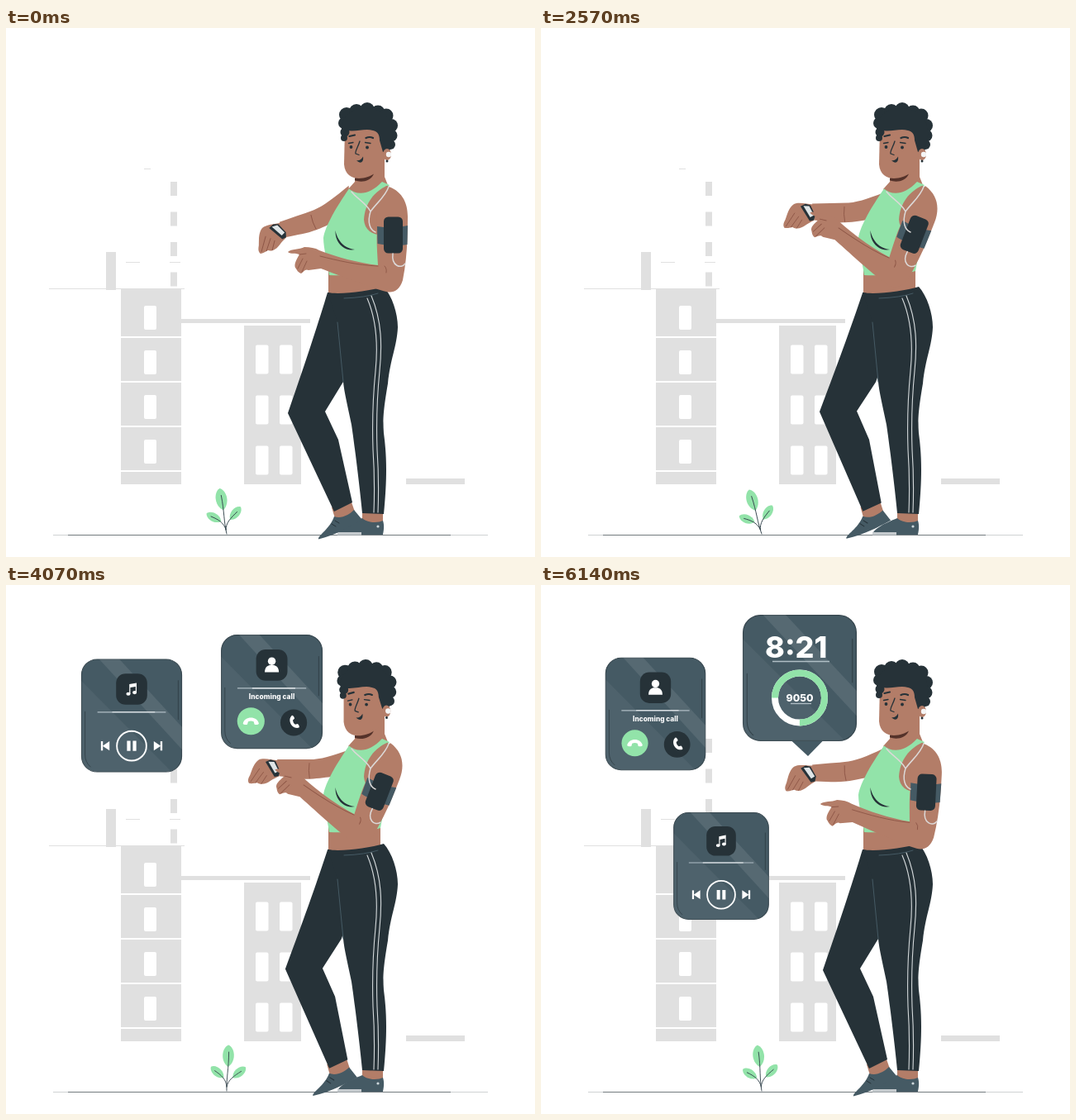
Write an HTML page that moves like this. It is 640x640 px and loops after 6.21 s.

```html
<!DOCTYPE html>
<html lang="en">
<head>
<meta charset="utf-8">
<title>Smartwatch</title>
<style>
html, body { margin: 0; width: 100%; height: 100%; overflow: hidden; background: #fff; }
svg { display: block; width: 100%; height: 100%; }
text { font-family: Inter, "Open Sans", sans-serif; font-weight: 800; fill: #fff; }
.dark { fill: #263238; }
.slate { fill: #455a64; }
.skin { fill: #b37d68; }
.mint { fill: #92e3a9; }
.white { fill: #fff; }
.line { fill: none; stroke-linecap: round; stroke-linejoin: round; }
.crease { stroke: #8d5646; stroke-width: .9; }
.ink { stroke: #263238; stroke-width: 1.3; }
.brow { stroke: #263238; stroke-width: 2.2; }
.cord { stroke: #dcd9d8; stroke-width: 1.5; }
.rule { stroke: #b0bec5; stroke-width: 1.3; }
</style>
</head>
<body>
<svg viewBox="0 0 640 640">
  <defs>
    <clipPath id="clip"><rect x="-65" y="-73" width="130" height="146" rx="20"/></clipPath>
    <g id="glass">
      <rect class="slate" x="-64.4" y="-72.4" width="128.8" height="144.8" rx="20" stroke="#37474f" stroke-width="1.2"/>
      <g clip-path="url(#clip)" fill="#fff">
        <path d="M-65-45L52 73H-65Z" opacity=".05"/>
        <path d="M-42-73H-16L65 15V44Z" opacity=".09"/>
      </g>
      <path class="line" d="M-60-5V50Q-60 60-53 66M60 5V-45" stroke="#263238" opacity=".65"/>
    </g>
    <g id="badge">
      <use href="#glass"/>
      <rect class="dark" x="-20" y="-54" width="40" height="40" rx="12"/>
      <path class="rule" d="M-44-4.5H44"/>
      <path d="M-25-4.5H30" stroke="#eceff1" stroke-width="1.2"/>
    </g>
    <g id="skip" class="white">
      <rect x="-5.5" y="-6" width="2.5" height="12"/>
      <path d="M5.5-6V6L-3.5 0Z"/>
    </g>
    <path id="handset" class="white" d="M-10 3C-8-7 8-7 10 3Q9 5 4.500 4L3.500 .5Q0-1-3.500 .5L-4.500 4Q-9 5-10 3Z"/>
    <path id="leaf" class="mint" d="M0 0C-11-8-8-25 0-28C8-25 11-8 0 0Z"/>
  </defs>

  <g id="city"></g>
  <path d="M57 613.500H583" stroke="#cfd2d3"/>
  <path d="M75 613.500H538" stroke="#737b7f"/>

  <g id="music">
    <use href="#badge"/>
    <g class="white" transform="translate(0 -33.500) scale(.85)">
      <ellipse cx="-5" cy="6.500" rx="3.200" ry="2.600"/>
      <ellipse cx="4.500" cy="4.500" rx="3.200" ry="2.600"/>
      <path d="M-3.500 6.500V-8L7.500-10V4.500H6V-4.500L-2-3V6.500Z"/>
    </g>
    <path class="white" d="M-6 32.500h4.500v13h-4.500zM1.500 32.500H6v13H1.500z"/>
    <circle class="line" cy="39" r="19" stroke="#fff" stroke-width="2"/>
    <use href="#skip" x="-34" y="39"/>
    <use href="#skip" transform="translate(34 39) scale(-1 1)"/>
  </g>

  <g id="call">
    <use href="#badge"/>
    <circle class="white" cy="-39" r="5"/>
    <path class="white" d="M-9-25C-9-31-6-33-3-34H3C6-33 9-31 9-25Z"/>
    <text y="9.500" font-size="8.900" text-anchor="middle">Incoming call</text>
    <g id="answer">
      <circle class="mint" r="17.200"/>
      <use href="#handset"/>
    </g>
    <g transform="translate(28 39.500)">
      <circle class="dark" r="17"/>
      <use href="#handset" transform="rotate(-120) scale(.9)"/>
    </g>
  </g>

  <g id="clock">
    <path class="slate" d="M-11 75L10 94.500L29 75Z"/>
    <use href="#glass" transform="scale(1.062 1.048)"/>
    <text id="time" x="-42" y="-25" font-size="36">8:20</text>
    <path class="rule" d="M-33-20H36"/>
    <circle class="line" cy="24" r="30" stroke="#fff" stroke-width="8"/>
    <path id="ring" fill="none" d="M30 24A30 30 0 1 1 0-6" stroke="#92e3a9" stroke-width="8"/>
    <text y="28" font-size="12.300" text-anchor="middle">9050</text>
    <path class="rule" d="M-11 31H14"/>
  </g>

  <g id="plant">
    <use href="#leaf" transform="translate(268 583) scale(.95)"/>
    <use href="#leaf" transform="translate(263 596) rotate(-51) scale(.72)"/>
    <use href="#leaf" transform="translate(274 596) rotate(49) scale(.72)"/>
    <path class="line" d="M267 612C266 597 269 585 268.500 565M267 607C266 598 260 593 252 588M267 607C268 599 275 594 284 588" stroke="#37474f" stroke-width=".9"/>
  </g>

  <!-- waist and legs -->
  <path class="skin" d="M390 292V326H453V286Z"/>
  <path class="skin" d="M431 584H456V600H431Z"/>
  <path class="slate" d="M431 593C437 599 450 599 456 596C458 602 457 608 456 613H401C402 606 416 599 431 593Z"/>
  <path d="M401 610H430V613.500H401Z" fill="#c5cbce"/>
  <circle cx="450" cy="603" r="1.600" fill="#cfd8dc"/>
  <g id="leg">
    <path class="skin" d="M394 580L417 571L423 588C414 595 406 596 398 593Z"/>
    <path class="slate" d="M397 591C406 594 415 589 421 583L431 595C415 604 400 613 378 618.500C377 614 392 606 397 591Z"/>
    <path class="line" d="M394 600l5 3M398 596l5 3" stroke="#263238"/>
    <path class="dark" d="M389 320C380 350 364 400 341 466L397 585L419 574L402 498L386 464L408 428L440 330Z"/>
  </g>
  <path class="dark" d="M389 320C405 323 440 318 457 313C467 324 474 345 474 362C473 385 465 400 462 430C456 465 456 475 457 490C461 520 461 545 457 588L431 587C428 555 421 500 418 480C414 460 409 440 408 428L400 352Z"/>
  <path class="line" d="M401 356L408 428M409 327Q435 326 450 321" stroke="#455a64"/>
  <path class="line" d="M437 327C449 355 450 385 447 415C444 445 443 480 444 510C446 540 446 560 445 586M442 324C455 355 455 385 452 415C449 445 448 480 449 510C451 540 451 560 450 586" stroke="#d5dadc" stroke-width="1.100"/>

  <!-- watch arm -->
  <g id="reach">
    <path class="skin" d="M421 196C402 204 385 211 372 212C358 213 342 213 328 214L331 234C345 235 355 237 368 236C380 235 390 233 396 232L415 220Z"/>
    <path class="skin" d="M329 215C322 215 312 212 306 215C300 219 298 228 296 234C294 238 293 241 295 244C299 245 303 243 305 243C310 246 316 244 321 240C325 237 328 236 331 234Z"/>
    <path class="line crease" d="M367 217Q366 226 368 235M307 226L297 242M312 230L303 243M316 234L310 244"/>
    <path class="dark" d="M314 217.500L320 214.500L326 216L332 228L330.500 234L325.500 235Z"/>
    <path d="M317.500 217L324.500 217L330.500 228L326 230.500Z" fill="#dfe5e7"/>
  </g>

  <!-- torso -->
  <path class="skin" d="M424 172L422 186L414 195L432 212L462 190L458 180V150Z"/>
  <path class="mint" d="M415 194.500C425 203 440 202 455 186L464 190C455 200 462 230 463 240L453 294C440 298 410 300 391 299C389 285 384 266 384 254C386 240 400 216 415 194.500Z"/>
  <path class="skin" d="M462 190.500C446 197 434 212 433 232C434 244 442 250 456 251L472 225Z"/>
  <path class="dark" d="M398.500 245C401 258 410 267 422 268C410 270.500 398 261 398.500 245Z"/>

  <g id="head">
    <path class="skin" d="M410 122L409 165C410 177 418 182 427 182C440 181 447 177 458 168V120Z"/>
    <path d="M422 181.500C431 183 440 180 445 176.500C441 186 430 187 422 184.500Z" fill="#54322a"/>
    <g id="curls" class="dark"></g>
    <path class="dark" d="M406 122C405 108 418 97 435 97C458 97 470 112 468 130L464 150H456L452 136C452 128 449 125 444 124C434 121 424 126 412 124Z"/>
    <ellipse class="skin" cx="461" cy="153" rx="5" ry="7"/>
    <circle cx="463" cy="153" r="3.200" fill="#f5f5f5"/>
    <circle class="dark" cx="461" cy="161" r="1.500"/>
    <path class="line brow" d="M415.500 131L422 129.500M435.500 133Q440 131 444 133"/>
    <path class="line ink" d="M428 137C426 144 422 149 423 152L427 153.500"/>
    <path class="dark" d="M424 160C427 161 430 159 432 155.500C433 162 429 165.500 424 160Z"/>
    <g id="open">
      <path class="line ink" d="M414.500 139.500L420 138.500M434.500 138.500L441 139.500"/>
      <circle class="dark" cx="417.500" cy="144" r="1.900"/>
      <circle class="dark" cx="437" cy="144.500" r="1.900"/>
    </g>
    <g id="shut">
      <path class="line ink" d="M414 139Q417 136 420.500 138.500M433.500 138.500Q437 136 442 139.500"/>
      <circle cx="417.500" cy="144" r="1.900" fill="#8d5646"/>
      <circle cx="437" cy="144.500" r="1.900" fill="#8d5646"/>
    </g>
  </g>

  <!-- pointing arm -->
  <g id="point">
    <path class="skin" d="M460 191C478 196 486 210 486 228C486 255 485 280 480 305C476 318 468 321 460 319C440 314 410 302 381 291L366 293C362 291 360 295 357 297C352 295 352 292 350 290C348 286 352 279 355 274C350 272 345 274 341 271C345 267 355 268 361 265C368 265 374 266 379 269C400 277 425 284 450 287C449 270 448 255 449 246C448 230 446 205 460 191Z"/>
    <path class="line crease" d="M380 276C400 281 425 287 450 288M458 288Q461 291 460 296M355 274L363 273M359 279L353 291M364 282L358 295"/>
    <path class="slate" d="M449 240Q468 243 486 239L485.500 262Q468 265 449.500 261Z"/>
    <rect class="dark" x="457" y="228.500" width="23" height="44" rx="5.500"/>
    <path class="line cord" d="M468 273C466 288 478 292 483 285"/>
  </g>
  <path class="line cord" d="M463 192C459 204 448 212 441 222C436 212 424 206 418 198M441 222C437 235 440 244 447 247"/>
</svg>

<script>
const LOOP = 6210;
const $ = id => document.getElementById(id);
const set = (id, value) => $(id).setAttribute('transform', value);

// Static repeats: city blocks and hair curls
const rect = (x, y, w, h, fill = '#e0e0e0', r = 0) =>
  `<rect x="${x}" y="${y}" width="${w}" height="${h}" rx="${r}" fill="${fill}"/>`;
let city = rect(52, 315, 164, 1) + rect(121, 271, 12, 46) +
  rect(167, 170, 8, 1) + rect(145, 283, 17, 1) + rect(198, 283, 13, 1) +
  rect(212, 352, 156, 5) + rect(484, 545, 71, 7) +
  rect(139, 316, 73, 236) + rect(288, 360, 69, 192);
for (let i = 0; i < 4; i++) {
  city += rect(199, 186 + i * 36.5, 8, 17) +
    rect(139, 373 + i * 54, 73, 2, '#fff') +
    rect(167, 336 + i * 54, 15, 29, '#fff', 2);
}
for (let i = 0; i < 6; i++) {
  city += rect(302 + i % 2 * 29, 383.5 + (i >> 1) * 61, 15.5, 35, '#fff', 2);
}
$('city').innerHTML = city;

$('curls').innerHTML = [
  [412, 105, 9], [424, 101, 9], [437, 99, 9], [450, 102, 8.5], [460, 106, 8.5],
  [466, 118, 8], [466, 130, 7.5], [465, 141, 6], [409, 115, 7], [410, 126, 5.5], [409, 133, 4]
].map(([x, y, r]) => `<circle cx="${x}" cy="${y}" r="${r}"/>`).join('');

const smooth = p => (1 - Math.cos(Math.PI * p)) / 2;
const cubic = p => p < .5 ? 4 * p ** 3 : 1 - 4 * (1 - p) ** 3;
const span = (t, a, b) => cubic(Math.min(1, Math.max(0, (t - a) / (b - a))));
const mix = (a, b, p) => a + (b - a) * p;

// Eased value through [time, value] points
function track(t, ...points) {
  if (t <= points[0][0]) return points[0][1];
  for (let i = 1; i < points.length; i++) {
    const [a, from] = points[i - 1], [b, to] = points[i];
    if (t < b) return mix(from, to, smooth((t - a) / (b - a)));
  }
  return points[points.length - 1][1];
}

// A card grows out of the watch at (323, 207)
function card(id, x, y, size, shown, alpha) {
  const k = mix(.5, 1, shown);
  set(id, `translate(${mix(323, x, k)} ${mix(207, y, k)}) scale(${size * k})`);
  $(id).setAttribute('opacity', alpha);
}

function draw(t) {
  const left = span(t, 3300, 4070), down = span(t, 4400, 5100);
  card('music', mix(mix(319, 152, left), 218, down), mix(mix(125, 158, left), 340, down),
    mix(mix(1, .94, left), .89, down), span(t, 2600, 3060), span(t, 2600, 3060));

  const aside = span(t, 4540, 5210);
  card('call', mix(321.5, 138.5, aside), mix(125.5, 156, aside ** 3), mix(.99, .935, aside),
    span(t, 3740, 4200), span(t, 3700, 4060));
  set('answer', `translate(-26.7 37.7) scale(${1 + .02 * Math.sin(t / 150)})`);

  card('clock', 313, 112.5, 1, span(t, 4680, 5140), span(t, 4700, 5170));
  set('ring', `rotate(${(t - 5000) * 180 / 1140} 0 24)`);
  $('time').textContent = t < 5600 ? '8:20' : '8:21';

  const turn = (id, angle, x, y) => set(id, `rotate(${angle} ${x} ${y})`);
  turn('plant', track(t, [0, -10], [1850, -22], [4200, 1.5], [6210, -6.5]), 267, 612);
  turn('leg', track(t, [1100, 0], [3070, 2], [5600, 0]), 400, 330);
  turn('reach', track(t, [0, -16.7], [1250, .5], [1930, 2.3], [3070, .5], [4070, 2.3], [6700, -3.5]), 400, 215);
  turn('point', 21 * track(t, [1330, 0], [1930, 1], [4050, 1], [6800, 0]), 462, 205);

  const nod = Math.sin(Math.PI * Math.min(t % 3100, 2000) / 2000) ** 2;
  turn('head', -1.3 * nod, 440, 185);
  const blink = t % 2000 > 930 && t % 2000 < 1130;
  $('open').setAttribute('opacity', blink ? 0 : 1);
  $('shut').setAttribute('opacity', blink ? 1 : 0);
}

function frame() {
  draw(performance.now() % LOOP);
  requestAnimationFrame(frame);
}
frame();
</script>
</body>
</html>
```
